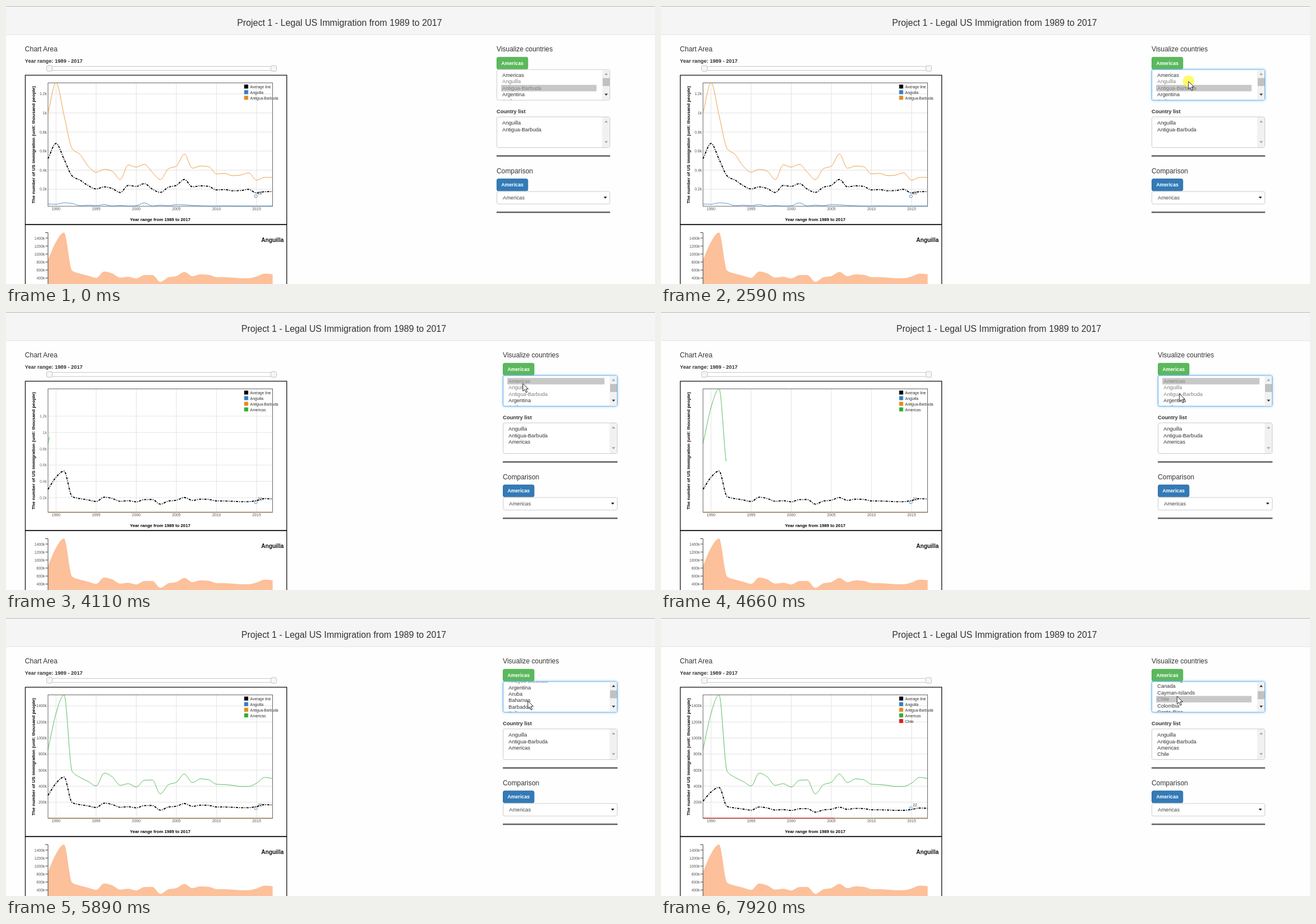
Recreate the animation shown at these times as an HTML page. Size 1143 by 490 pixels, loop 8000 ms.

```html
<!DOCTYPE html>
<html lang="en">
<head>
<meta charset="utf-8">
<title>Legal US Immigration</title>
<style>
  html, body { margin: 0; width: 100%; height: 100%; overflow: hidden; background: #fefefe; }
  svg { display: block; width: 1143px; height: 490px; font-family: "Liberation Sans", Arial, sans-serif; fill: #333; }
  .bold { font-weight: bold; }
  .line { fill: none; stroke-width: 1; }
  .grid { stroke: #e2e2e2; stroke-width: 1; }
</style>
</head>
<body>
<svg id="stage" viewBox="0 0 1143 490"></svg>
<script>
const LOOP = 8000, DRAW = 2000, RESCALE = 1000;
const FIRST_ADD = 3780, SECOND_ADD = 6860;
const COLORS = { avg: '#000', anguilla: '#2f7fc4', antigua: '#e8891c', americas: '#2fae35', chile: '#d9201f' };

const anguilla = [45, 42, 57, 51, 27, 33, 27, 39, 24, 30, 24, 27, 57, 24, 33, 27, 39, 36, 30, 27, 24, 24, 26, 25, 24, 24, 24, 24, 25];
const antigua = [997, 1318, 973, 628, 563, 443, 378, 408, 390, 301, 455, 432, 461, 378, 301,
  414, 443, 568, 420, 443, 437, 360, 366, 342, 348, 372, 295, 324, 324];
const americas = [855, 1307, 1537, 587, 509, 459, 403, 562, 516, 410, 431, 389, 473, 477, 304,
  417, 449, 551, 445, 491, 481, 424, 420, 410, 396, 396, 438, 509, 495].map(v => v * 1000);
const countries = ['Americas', 'Anguilla', 'Antigua-Barbuda', 'Argentina', 'Aruba', 'Bahamas', 'Barbados', 'Belize',
  'Bermuda', 'Bolivia', 'Brazil', 'British-Virgin-Islands', 'Canada', 'Cayman-Islands', 'Chile', 'Colombia', 'Costa-Rica'];

const x = year => 74 + (year - 1989) * 14.13;
const ySmall = v => 356.5 - v * .168;
const yLarge = v => 353 - v * .0001415;
const yArea = v => 507.7 - v * .0000705;
const clamp = v => Math.max(0, Math.min(1, v));
const ease = v => (v = clamp(v)) < .5 ? 4 * v ** 3 : 1 - 4 * (1 - v) ** 3;

// ---- SVG helpers
function set(node, attrs) {
  for (const key in attrs) node.setAttribute(key, attrs[key]);
  return node;
}
function add(parent, tag, attrs) {
  return parent.appendChild(set(document.createElementNS('http://www.w3.org/2000/svg', tag), attrs));
}
const rect = (parent, x, y, width, height, attrs) => add(parent, 'rect', { x, y, width, height, ...attrs });
const path = (parent, d, attrs) => add(parent, 'path', { d, ...attrs });
const group = (parent, attrs) => add(parent, 'g', attrs);
function text(parent, x, y, size, content, attrs) {
  const node = add(parent, 'text', { x, y, 'font-size': size, ...attrs });
  node.textContent = content;
  return node;
}
const show = (node, on) => node.setAttribute('visibility', on ? 'visible' : 'hidden');

// Monotone cubic through one value per year
function curve(values, scale) {
  const step = 14.13, ys = values.map(scale), n = ys.length;
  const slope = i => (ys[i + 1] - ys[i]) / step;
  const tangent = ys.map((_, i) => {
    if (i === 0) return slope(0);
    if (i === n - 1) return slope(n - 2);
    const a = slope(i - 1), b = slope(i);
    return (Math.sign(a) + Math.sign(b)) * Math.min(Math.abs(a), Math.abs(b), Math.abs(a + b) / 4);
  });
  let d = `M${x(1989)} ${ys[0]}`;
  for (let i = 1; i < n; i++) {
    const x0 = x(1988 + i), x1 = x(1989 + i), third = step / 3;
    d += `C${x0 + third} ${ys[i - 1] + tangent[i - 1] * third} ${x1 - third} ${ys[i] - tangent[i] * third} ${x1} ${ys[i]}`;
  }
  return d;
}
const average = (count, ...series) => series[0].map((_, i) => series.reduce((sum, s) => sum + s[i], 0) / count);

const stage = document.getElementById('stage');

// ---- Header and chart captions
rect(stage, 0, 0, 1143, 51, { fill: '#f5f5f5' });
rect(stage, 0, 0, 1143, 1, { fill: '#b5b5b5' });
rect(stage, 0, 50, 1143, 1, { fill: '#e4e4e4' });
const title = text(stage, 407, 34.5, 15.8, 'Project 1 - Legal US Immigration from 1989 to 2017');
text(stage, 33.3, 80, 12, 'Chart Area');
text(stage, 33.3, 99.5, 9.2, 'Year range: 1989 - 2017', { class: 'bold' });
rect(stage, 72.5, 106.5, 403, 7, { rx: 2.5, fill: '#fff', stroke: '#c8c8c8' });
for (const left of [71.5, 466.5]) rect(stage, left, 105, 10, 10, { rx: 2.5, fill: '#f6f6f6', stroke: '#c2c2c2' });

// ---- Line chart
rect(stage, 34, 122, 460.5, 263, { fill: '#fff', stroke: '#000', 'stroke-width': 1.2 });
const plot = group(stage);
for (let year = 1990; year <= 2015; year += 5) {
  path(plot, `M${x(year)} 135.5V353`, { class: 'grid' });
  text(plot, x(year), 360, 6.8, year, { 'text-anchor': 'middle', fill: '#555' });
}
function makeTick(value, label) {
  const node = group(plot);
  path(node, 'M74 0H469.5', { class: 'grid' });
  text(node, 72, 2.5, 6.8, label, { 'text-anchor': 'end', fill: '#555' });
  return { node, value };
}
const smallTicks = [.2, .4, .6, .8, 1, 1.2].map(v => makeTick(v * 1000, v + 'k'));
const largeTicks = [200, 400, 600, 800, 1000, 1200, 1400].map(v => makeTick(v * 1000, v + 'k'));
rect(plot, 74, 135.5, 395.5, 217.5, { fill: 'none', stroke: '#666', 'stroke-width': 1 });

const series = (color, d) => path(plot, d, { class: 'line', stroke: color, pathLength: 1, opacity: .8 });
const paths = {
  anguilla: [curve(anguilla, ySmall), curve(anguilla, yLarge)],
  antigua: [curve(antigua, ySmall), curve(antigua, yLarge)],
  avg: [
    curve(average(2, anguilla, antigua), ySmall),
    curve(average(3, anguilla, antigua, americas), yLarge),
    curve(average(4, anguilla, antigua, americas), yLarge)
  ]
};
const anguillaLine = series(COLORS.anguilla, paths.anguilla[0]);
const antiguaLine = series(COLORS.antigua, paths.antigua[0]);
const americasLine = series(COLORS.americas, curve(americas, yLarge));
const chileLine = set(series(COLORS.chile, `M${x(1989)} 352.6H${x(2017)}`), { 'stroke-width': 1.4, opacity: 1 });
add(plot, 'circle', { cx: 440, cy: 335.3, r: 2.6, fill: '#fff', stroke: '#4a90cc' });
text(plot, 443.5, 332, 6.8, '22', { fill: '#444' });
const avgLine = path(plot, paths.avg[0], { class: 'line', stroke: '#000', style: 'stroke-width:1.8;stroke-dasharray:4 2 1.3 2' });

const legend = [['Average line', 'avg'], ['Anguilla', 'anguilla'], ['Antigua-Barbuda', 'antigua'], ['Americas', 'americas'], ['Chile', 'chile']]
  .map(([label, key], i) => {
    const node = group(plot, { transform: `translate(419.5 ${138.5 + i * 9.9})` });
    rect(node, 0, 0, 7, 7, { fill: COLORS[key] });
    text(node, 10.5, 6.5, 6.6, label);
    return node;
  });
text(stage, 0, 0, 7.96, 'The number of US immigration (unit: thousand people)',
  { class: 'bold', fill: '#000', transform: 'translate(51 348) rotate(-90)' });
text(stage, 271.5, 379, 7.7, 'Year range from 1989 to 2017', { class: 'bold', fill: '#000', 'text-anchor': 'middle' });

// ---- Area chart
rect(stage, 34, 385.5, 460.5, 130, { fill: '#fff', stroke: '#000', 'stroke-width': 1.2 });
path(stage, curve(americas, yArea) + 'V500H74Z', { fill: '#fcc09a' });
path(stage, 'M69 399.5H74V490', { class: 'line', stroke: '#444' });
for (let v = 400; v <= 1400; v += 200) {
  const y = yArea(v * 1000);
  path(stage, `M69.5 ${y}H74`, { stroke: '#444' });
  text(stage, 68.5, y + 2.5, 6.8, v + 'k', { 'text-anchor': 'end', fill: '#555' });
}
text(stage, 489, 416, 10, 'Anguilla', { class: 'bold', fill: '#111', 'text-anchor': 'end' });

// ---- Side panel; stretchy parts follow the panel's right edge
const side = group(stage);
const stretchy = [], edges = [];
function stretch(...args) {
  const node = rect(side, ...args);
  stretchy.push(node);
  return node;
}
function edge() {
  const node = group(side);
  edges.push(node);
  return node;
}
const triangle = (parent, cx, cy, dir, fill) =>
  path(parent, `M${cx - 3} ${cy + dir * 1.7}h6l-3 ${-dir * 3.4}Z`, { fill });
function button(y, fill, stroke) {
  rect(side, 864.5, y, 54.5, 21, { rx: 2.5, fill, stroke });
  text(side, 891.8, y + 13.6, 8.7, 'Americas', { class: 'bold', 'text-anchor': 'middle', fill: '#fff' });
}
text(side, 864, 80, 11.9, 'Visualize countries');
text(side, 864, 189, 9.2, 'Country list', { class: 'bold' });
text(side, 864, 294.5, 11.9, 'Comparison');
button(90.3, '#5cb85c', '#4cae4c');
button(304.8, '#337ab7', '#2e6da4');
stretch(864, 263, 200, 2.6, { fill: '#666' });
stretch(864, 362.3, 200, 2.6, { fill: '#666' });
stretch(864.5, 327, 199, 22, { rx: 2.5, fill: '#fff', stroke: '#ccc' });
text(side, 875, 341.3, 9.2, 'Americas', { fill: '#444' });
triangle(edge(), 1055.5, 337.7, -1, '#222');

const listBox = stretch(864.5, 112, 199, 54, { rx: 2.5, fill: '#fff' });
const clip = add(add(stage, 'defs'), 'clipPath', { id: 'list-clip' });
rect(clip, 865, 112.5, 202, 53);
const list = group(group(side, { 'clip-path': 'url(#list-clip)' }));
const highlight = rect(list, 872, 0, 168, 11.4);
const options = countries.map((name, i) => text(list, 874, 125 + i * 11.4, 9.2, name));
const bar = edge();
rect(bar, 1050, 112.6, 13, 52.8, { fill: '#f1f1f1' });
const thumb = rect(bar, 1051, 127, 12, 14, { fill: '#c1c1c1' });
const upArrow = triangle(bar, 1057, 119.7, 1);
triangle(bar, 1057, 156.3, -1, '#333');

stretch(864.5, 195.5, 199, 54, { rx: 2.5, fill: '#fff', stroke: '#ccc' });
const chosen = ['Anguilla', 'Antigua-Barbuda', 'Americas', 'Chile']
  .map((name, i) => text(side, 874, 209.3 + i * 11.2, 9.2, name));
const idleBar = edge();
rect(idleBar, 1050, 196, 13, 53, { fill: '#f1f1f1' });
triangle(idleBar, 1057, 203.5, 1, '#a3a3a3');
triangle(idleBar, 1057, 240, -1, '#a3a3a3');

// ---- Pointer
const pointer = group(stage);
const halo = add(pointer, 'circle', { r: 10.3, cy: -.5, fill: '#fff838' });
path(pointer, 'M0 0V13.5L3.2 10.6L5.6 16L7.8 15L5.5 9.8H9.7Z', { fill: '#fff', stroke: '#111', 'stroke-width': .9 });

const route = [
  [130, 1036, 470], [360, 730, 228], [610, 730, 228], [1230, 929, 133], [3100, 929, 133], [3260, 909, 118],
  [3900, 909, 118], [4590, 913, 144], [5430, 914, 145], [5660, 919, 146], [6290, 919, 146], [6360, 909, 138]
];
const presses = [[1630, 1940, 2040], [2360, 2730, 2950], [3580, 3810, 3810], [6590, 6900, 6900]];
const wheel = [[5890, 33.6], [5960, 68], [6040, 103], [6120, 138.4]];

function pointerAt(t) {
  const i = route.findIndex(stop => stop[0] > t);
  if (i < 0) return route[route.length - 1].slice(1);
  if (i === 0) return route[0].slice(1);
  const [t0, x0, y0] = route[i - 1], [t1, x1, y1] = route[i], p = (t - t0) / (t1 - t0);
  return [x0 + (x1 - x0) * p, y0 + (y1 - y0) * p];
}
function haloAt(t) {
  const press = presses.find(([from, , to]) => t >= from && t < to);
  if (!press) return 0;
  const [, release, gone] = press;
  return .72 * (t < release ? 1 : 1 - (t - release) / (gone - release));
}

function renderChart(t, stageIndex) {
  const large = stageIndex > 0;
  const p = large ? ease((t - FIRST_ADD) / RESCALE) : 0;
  const place = ({ node, value }, opacity) => {
    const y = ySmall(value) + (yLarge(value) - ySmall(value)) * p;
    set(node, { transform: `translate(0 ${y})`, opacity: y < 136 ? 0 : opacity });
  };
  smallTicks.forEach(tick => place(tick, 1 - p));
  largeTicks.forEach(tick => place(tick, p));
  avgLine.setAttribute('d', paths.avg[stageIndex]);
  anguillaLine.setAttribute('d', paths.anguilla[+large]);
  antiguaLine.setAttribute('d', paths.antigua[+large]);
  for (const [line, start, on] of [[americasLine, FIRST_ADD, large], [chileLine, SECOND_ADD, stageIndex > 1]]) {
    show(line, on);
    line.setAttribute('stroke-dasharray', `${ease((t - start) / DRAW)} 2`);
  }
  legend.forEach((entry, i) => show(entry, i < 3 + stageIndex));
}

function renderPanel(t, stageIndex) {
  const wide = stageIndex === 1 ? 1 : 0;
  title.setAttribute('x', 407 + wide * 7.5);
  side.setAttribute('transform', `translate(${wide * 11} 0)`);
  edges.forEach(node => node.setAttribute('transform', `translate(${wide * 2} 0)`));
  stretchy.forEach(node => node.setAttribute('width', (node.y.baseVal.value === 263 || node.getAttribute('y') === '362.3' ? 200 : 199) + wide * 2));

  const focused = t >= 1630;
  set(listBox, {
    stroke: focused ? '#66afe9' : '#ccc',
    style: focused ? 'filter:drop-shadow(0 0 2px rgba(102,175,233,.7))' : ''
  });
  const scroll = wheel.reduce((now, [at, top]) => t >= at ? top : now, 0);
  list.setAttribute('transform', `translate(0 ${-scroll})`);
  thumb.setAttribute('y', 127 + scroll * .015);
  upArrow.setAttribute('fill', scroll ? '#333' : '#a3a3a3');

  const selected = t >= 6590 ? 14 : t >= 3580 ? 0 : 2;
  const pressed = t >= 3580 && t < 3810 || t >= 6590 && t < 6900;
  set(highlight, { y: 116.2 + selected * 11.4, width: 168 + wide * 3, fill: pressed ? '#1e90ff' : '#c8c8c8' });
  options.forEach((option, i) => {
    const used = i === 1 || i === 2 || i === 0 && stageIndex > 0 || i === 14 && stageIndex > 1;
    option.setAttribute('fill', pressed && i === selected ? '#fff' : used ? '#808080' : '#333');
  });
  chosen.forEach((item, i) => show(item, i < 2 + stageIndex));
}

function render(now) {
  const t = now % LOOP;
  const stageIndex = t >= 6900 ? 2 : t >= 3810 ? 1 : 0;
  renderChart(t, stageIndex);
  renderPanel(t, stageIndex);
  show(pointer, t >= 130);
  pointer.setAttribute('transform', `translate(${pointerAt(t).join(' ')})`);
  halo.setAttribute('opacity', haloAt(t));
}

const start = performance.now();
function frame() {
  render(performance.now() - start);
  requestAnimationFrame(frame);
}
frame();
</script>
</body>
</html>
```
